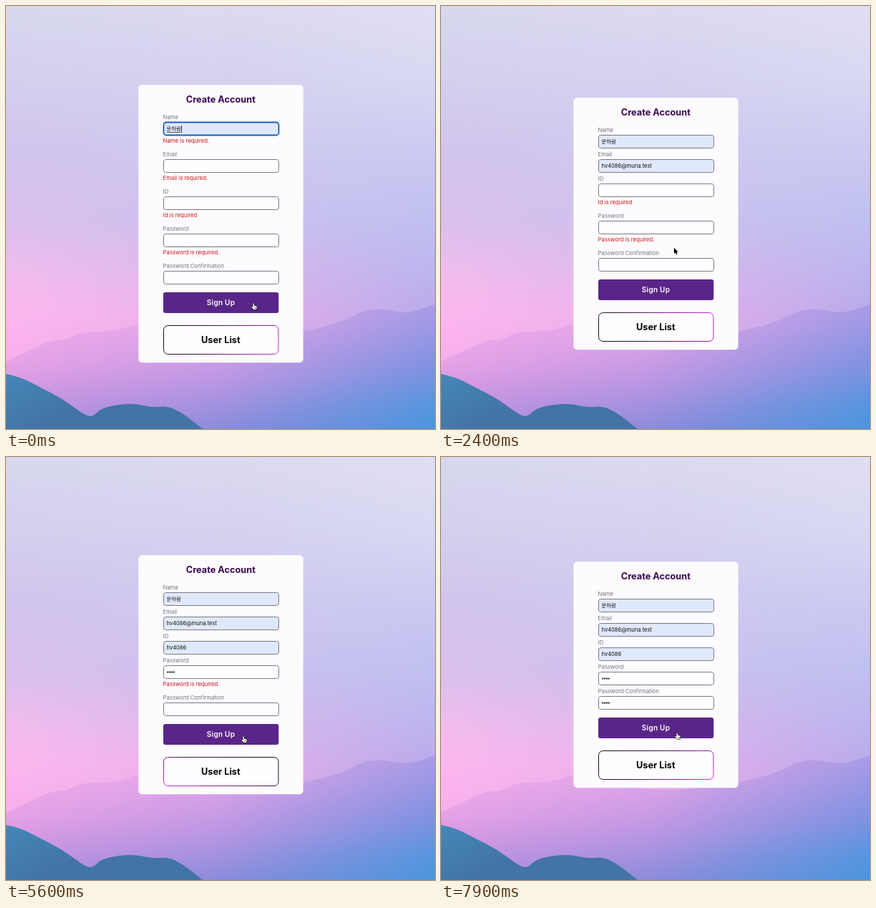
An HTML page with a canvas for the animation above (8 s loop, 600 by 591 pixels).

```html
<!DOCTYPE html>
<html lang="en">
<head>
<meta charset="utf-8">
<title>Create Account</title>
<style>
html, body { margin: 0; width: 100%; height: 100%; overflow: hidden; }
canvas { display: block; }
</style>
</head>
<body>
<canvas id="stage" width="600" height="591"></canvas>
<script>
const W = 600, H = 591, LOOP = 8000;
const ctx = document.getElementById('stage').getContext('2d');
const SANS = 'Inter, "Noto Sans CJK KR", "Noto Sans CJK", sans-serif';

const USER = '문하람', LOGIN = 'hv4086', MAIL = LOGIN + '@muna.test';
const SUGGESTIONS = [MAIL, 'bano4086@mume.test', 'jkla@uno.test', '01000004086',
  '30471952@uni.test', 'sorin0417@mume.test'];
const LABELS = ['Name', 'Email', 'ID', 'Password', 'Password Confirmation'];
const REQUIRED = ['Name is required.', 'Email is required.', 'Id is required', 'Password is required.'];
const MISMATCH = ['Password and Password Confirmation do', 'not match'];

// Moments of each Sign Up press, and [field, from, to] spans of focus.
const SUBMITS = [500, 2150, 4000, 5700, 7600];
const FOCUS = [[0, 0, 500], [1, 1000, 2100], [2, 2700, 3900], [3, 4600, 5500], [4, 6300, 7500]];

// Pointer path: time, x, y, shape
const POINTER = [
  [0, 347, 420, 'hand'], [500, 347, 418, 'hand'], [650, 340, 370, 'arrow'], [900, 300, 216, 'beam'],
  [1250, 300, 217, 'arrow'], [1400, 301, 229, 'arrow'], [1600, 304, 243, 'arrow'], [1750, 306, 244, 'arrow'],
  [2030, 327, 398, 'hand'], [2200, 327, 398, 'hand'], [2320, 326, 365, 'arrow'], [2400, 326, 338, 'arrow'],
  [2650, 302, 258, 'beam'], [3450, 302, 260, 'arrow'], [3800, 330, 394, 'hand'], [4050, 330, 392, 'hand'],
  [4200, 331, 379, 'hand'], [4280, 328, 360, 'arrow'], [4550, 300, 301, 'beam'], [5200, 302, 303, 'arrow'],
  [5450, 332, 392, 'hand'], [5600, 333, 395, 'hand'], [5800, 332, 390, 'arrow'], [6150, 282, 331, 'beam'],
  [6400, 280, 334, 'beam'], [7050, 281, 335, 'arrow'], [7400, 330, 391, 'hand'], [8000, 331, 390, 'hand']
];

// Border gradient heading in degrees over time
const TURN = [[0, 120], [1400, 435], [2400, 765], [4200, 1260], [5600, 1640], [6400, 1935], [7900, 2295], [8000, 2320]];

function segment(keys, t) {
  let i = 0;
  while (i < keys.length - 2 && t >= keys[i + 1][0]) i++;
  const a = keys[i], b = keys[i + 1];
  return { a, b, u: Math.min(1, (t - a[0]) / (b[0] - a[0])) };
}
const mix = (a, b, u) => a + (b - a) * u;

function layer() {
  const c = document.createElement('canvas');
  c.width = W;
  c.height = H;
  return c;
}

// Three vertical gradients blended from left to right.
function wash(columns) {
  const out = layer(), g = out.getContext('2d');
  columns.forEach((stops, i) => {
    const c = layer(), k = c.getContext('2d');
    const v = k.createLinearGradient(0, 0, 0, H);
    stops.forEach(([y, color]) => v.addColorStop(y / H, color));
    k.fillStyle = v;
    k.fillRect(0, 0, W, H);
    if (i) {
      k.globalCompositeOperation = 'destination-in';
      const m = k.createLinearGradient(W / 2 * (i - 1), 0, W / 2 * i, 0);
      m.addColorStop(0, 'rgba(0,0,0,0)');
      m.addColorStop(1, '#000');
      k.fillStyle = m;
      k.fillRect(0, 0, W, H);
    }
    g.drawImage(c, 0, 0);
  });
  return out;
}

function ridge(g, points) {
  g.beginPath();
  g.moveTo(points[0][0], H);
  g.lineTo(...points[0]);
  for (let i = 1; i < points.length - 1; i++) {
    const [x, y] = points[i], [nx, ny] = points[i + 1];
    g.quadraticCurveTo(x, y, (x + nx) / 2, (y + ny) / 2);
  }
  const end = points[points.length - 1];
  g.lineTo(...end);
  g.lineTo(end[0], H);
  g.closePath();
}

function paintScene() {
  const scene = layer(), g = scene.getContext('2d');
  g.drawImage(wash([
    [[0, '#d8d8ef'], [100, '#d5d0ee'], [200, '#d1c5ec'], [300, '#dac0ec'], [380, '#f3bcee'], [430, '#fdb7ef'], [490, '#f9b0ec']],
    [[0, '#dcdaf1'], [100, '#d5d2ef'], [200, '#cfc9ef'], [300, '#ccc1ee'], [380, '#dcb6ec'], [430, '#e8b0ea'], [480, '#e6acea']],
    [[0, '#e0def3'], [100, '#d9d8f2'], [200, '#cbcaf1'], [300, '#bfc0f0'], [380, '#bcb3ed'], [440, '#b8a8e9']]
  ]), 0, 0);

  g.save();
  ridge(g, [[0, 497], [30, 483], [62, 467], [85, 467], [100, 457], [125, 455], [160, 453], [190, 441],
    [300, 470], [400, 457], [440, 450], [478, 438], [500, 425], [530, 423], [560, 430], [600, 417]]);
  g.clip();
  g.drawImage(wash([
    [[450, '#f0abea'], [500, '#e7a2e6'], [540, '#d398e2'], [591, '#b08edc']],
    [[450, '#dfa4e8'], [520, '#bd97e3'], [591, '#8a8cdb']],
    [[415, '#ac9ce6'], [500, '#8192e1'], [560, '#5595de'], [591, '#4b95dc']]
  ]), 0, 0);
  g.restore();

  ridge(g, [[0, 514], [20, 518], [50, 534], [78, 548], [106, 569], [120, 575], [132, 563], [150, 558],
    [178, 555], [205, 561], [226, 559], [246, 568], [275, 591]]);
  const near = g.createLinearGradient(0, 514, 40, 591);
  near.addColorStop(0, '#4488b8');
  near.addColorStop(1, '#4274a6');
  g.fillStyle = near;
  g.fill();
  return scene;
}
const scene = paintScene();

function box(x, y, w, h, r, fill, stroke, line = 1) {
  ctx.beginPath();
  ctx.roundRect(x, y, w, h, r);
  if (fill) {
    ctx.fillStyle = fill;
    ctx.fill();
  }
  if (stroke) {
    ctx.strokeStyle = stroke;
    ctx.lineWidth = line;
    ctx.stroke();
  }
}

function text(str, x, y, size, color, weight = 400, align = 'left', spacing = 0) {
  ctx.font = `${weight} ${size}px ${SANS}`;
  ctx.letterSpacing = spacing + 'px';
  ctx.textAlign = align;
  ctx.fillStyle = color;
  ctx.fillText(str, x, y);
}

function fieldValue(i, t) {
  if (i === 0) return USER;
  if (i === 1) return t >= 1750 ? MAIL : '';
  if (i === 2) return t >= 3400 ? LOGIN : '';
  const start = i === 3 ? 4750 : 6600;
  return '•'.repeat(Math.max(0, Math.min(4, Math.ceil((t - start) / 120))));
}

function errorLines(i, step) {
  if (i < 4) return step <= i && !(i === 3 && step > 3) ? [REQUIRED[i]] : [];
  return step === 4 ? MISMATCH : [];
}

function drawField(i, y, t, focused) {
  const value = fieldValue(i, t);
  const fill = i < 3 && value ? '#e0e9fb' : '#fefdff';
  if (focused) box(220.5, y + .5, 161, 18, 3.5, fill, '#1a62c4', 1.8);
  else box(220.5, y + .5, 161, 18, 3, fill, '#7d7983');

  let end = 225;
  if (i > 2) {
    ctx.fillStyle = '#111';
    for (let n = 0; n < value.length; n++) {
      ctx.beginPath();
      ctx.arc(226.3 + n * 2.8, y + 9.6, 1.15, 0, 7);
      ctx.fill();
    }
    end += value.length * 2.8;
  } else if (value) {
    text(value, 224.5, y + 12.2, i ? 7.6 : 7.3, '#111', i ? 400 : 500);
    end += ctx.measureText(value).width;
    if (i === 0 && t < 300) {
      ctx.fillStyle = '#333';
      ctx.fillRect(225, y + 14, end - 225.5, .8);
    }
  }
  if (focused) {
    ctx.fillStyle = '#222';
    ctx.fillRect(Math.round(end), y + 5, .9, 10);
  }
}

function drawSuggestions(y, hover) {
  ctx.save();
  ctx.shadowColor = 'rgba(0,0,0,.35)';
  ctx.shadowBlur = 3;
  ctx.shadowOffsetY = 1;
  box(277, y, 103.5, 131, 1, '#fdfcfe');
  ctx.restore();
  if (hover) {
    ctx.fillStyle = '#ececf0';
    ctx.fillRect(277, y + 4.5, 103.5, 20.5);
  }
  SUGGESTIONS.forEach((s, i) => text(s, 283, y + 17.5 + i * 20.8, 7.7, '#151515', 450));
}

function drawListButton(y, t) {
  const k = segment(TURN, t);
  const a = mix(k.a[1], k.b[1], k.u) * Math.PI / 180;
  const dx = Math.sin(a), dy = -Math.cos(a);
  const half = Math.abs(dx) * 81 + Math.abs(dy) * 20;
  const cx = 300.5, cy = y + 20.5;
  const g = ctx.createLinearGradient(cx - dx * half, cy - dy * half, cx + dx * half, cy + dy * half);
  g.addColorStop(0, '#111');
  g.addColorStop(.35, '#2d1433');
  g.addColorStop(1, '#cf2fd6');
  box(220.5, y + .5, 160.5, 40, 6, '#fefdff', g);
  text('User List', 300.3, y + 25.2, 12.75, '#08060a', 700, 'center');
}

function drawCard(t) {
  const step = SUBMITS.filter(s => t >= s).length;
  const errors = LABELS.map((_, i) => errorLines(i, step));
  const extra = errors.map(e => e.length ? 8 + 10 * e.length : 0);
  const height = 316 + extra.reduce((a, b) => a + b);
  const top = 304 - height / 2;
  box(185.3, top + .3, 230.4, height, 5, '#fdfbfe');
  text('Create Account', 300.3, top + 24.7, 12.75, '#3a0650', 700, 'center');

  let y = top + 52, mailY = 0;
  LABELS.forEach((label, i) => {
    const focused = FOCUS.some(([f, from, to]) => f === i && t >= from && t < to);
    text(label, 219.6, y - 3.9, 7.75, '#77727b');
    drawField(i, y, t, focused);
    errors[i].forEach((line, n) => text(line, 219.6, y + 28.8 + n * 10, 7.75, '#cb151b'));
    if (i === 1) mailY = y;
    y += 34 + extra[i];
  });

  box(220, y - 4, 161.3, 29, 3, '#5a2588');
  text('Sign Up', 300.5, y + 14.1, 10, '#fff', 600, 'center', .25);
  drawListButton(y + 42, t);
  if (t >= 1050 && t < 1750) drawSuggestions(mailY + 23, t >= 1480);
}

const SHAPES = {
  arrow: new Path2D('M0 0V8.4L1.9 6.7L3.2 9.5L4.6 8.9L3.3 6.1H5.8Z'),
  hand: new Path2D('M-1.7 -4C-1.7 -5 -.3 -5 -.2 -4L.2 -1.3L2.9 -.8Q4 -.5 3.8 .8L3.2 4H-.8L-3.3 .8C-3.7 -.2 -2.5 -.6 -1.2 .6Z'),
  beam: new Path2D('M-1.8 -4.5Q0 -4.5 0 -3.4Q0 -4.5 1.8 -4.5M0 -3.5V3.5M-1.8 4.5Q0 4.5 0 3.4Q0 4.5 1.8 4.5M-1 1H1')
};

function drawPointer(t) {
  const { a, b, u } = segment(POINTER, t);
  const shape = a[3];
  ctx.save();
  ctx.translate(mix(a[1], b[1], u), mix(a[2], b[2], u));
  ctx.lineJoin = 'round';
  const outline = (color, width) => {
    ctx.strokeStyle = color;
    ctx.lineWidth = width;
    ctx.stroke(SHAPES[shape]);
  };
  if (shape === 'beam') {
    outline('#fff', 2);
    outline('#111', 1);
  } else {
    outline(shape === 'arrow' ? '#fff' : '#111', 1.4);
    ctx.fillStyle = shape === 'arrow' ? '#000' : '#fff';
    ctx.fill(SHAPES[shape]);
    if (shape === 'hand') {
      ctx.fillStyle = '#333';
      for (const x of [-.1, 1.2, 2.4]) ctx.fillRect(x, .9, .5, 2);
    }
  }
  ctx.restore();
}

function frame(now) {
  const t = now % LOOP;
  ctx.drawImage(scene, 0, 0);
  drawCard(t);
  drawPointer(t);
  requestAnimationFrame(frame);
}
requestAnimationFrame(frame);
</script>
</body>
</html>
```
